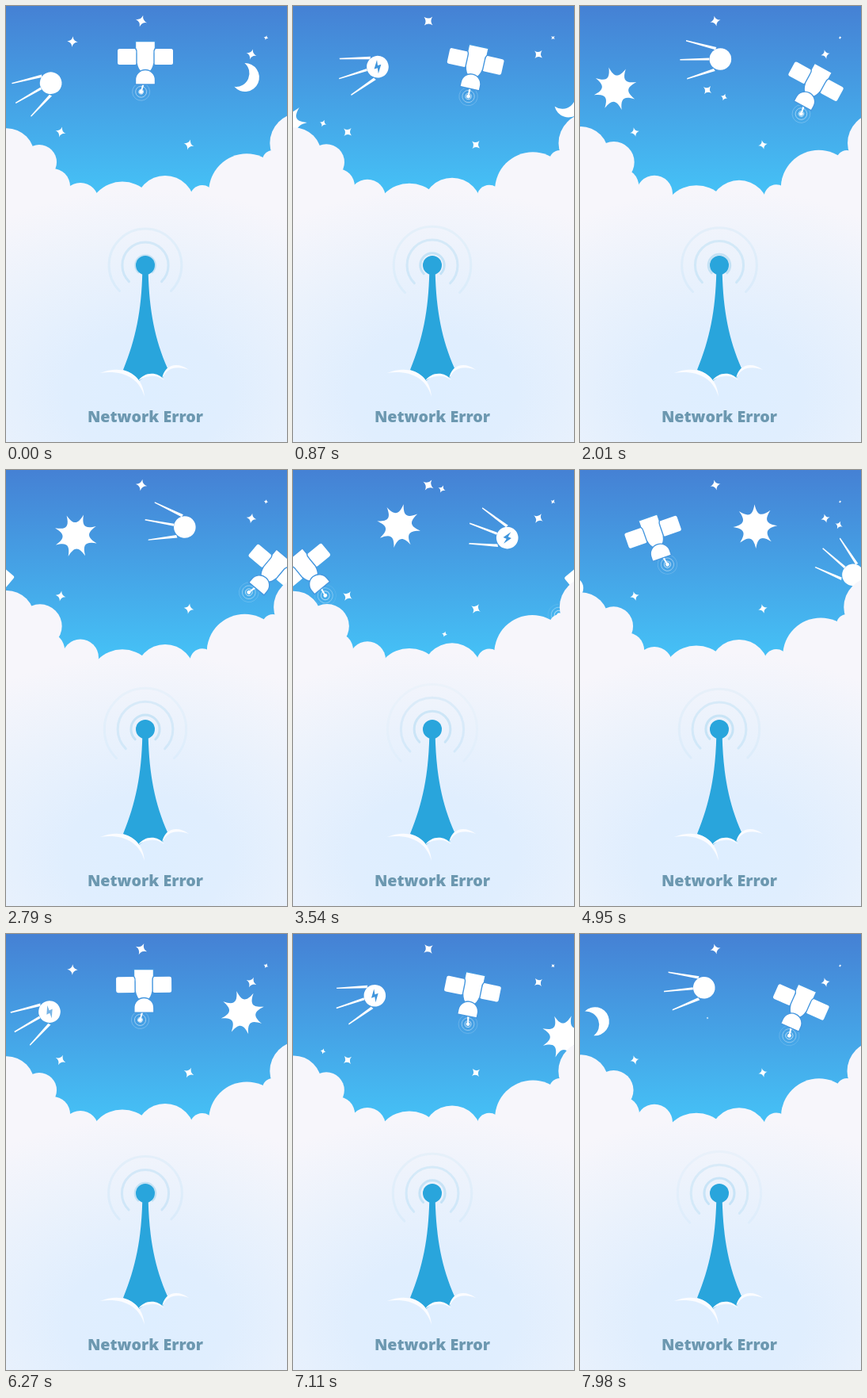
An HTML page that plays this animation: 355x550 px, repeating every 8000 ms.

```html
<!DOCTYPE html>
<html lang="en">
<head>
<meta charset="utf-8">
<title>Network Error</title>
<style>
  html, body { margin: 0; width: 100%; height: 100%; overflow: hidden; }
  svg { display: block; width: 355px; height: 550px; }
  text { font: 800 19.7px "Open Sans", "Noto Sans", sans-serif; fill: #6c98b0; }
</style>
</head>
<body>
<svg viewBox="0 0 355 550">
  <defs>
    <linearGradient id="sky" gradientUnits="userSpaceOnUse" x1="0" y1="0" x2="0" y2="228">
      <stop stop-color="#4581d4"/><stop offset="1" stop-color="#45bff5"/>
    </linearGradient>
    <radialGradient id="mist" gradientUnits="userSpaceOnUse" r="1" gradientTransform="translate(178 490) scale(350 260)" cx="0" cy="0">
      <stop stop-color="#deeeff"/><stop offset=".3" stop-color="#e0eefe"/><stop offset=".65" stop-color="#ebf2fc"/><stop offset="1" stop-color="#f7f6fb"/>
    </radialGradient>
    <path id="star" d="M0-1Q.13-.13 1 0Q.13.13 0 1Q-.13.13-1 0Q-.13-.13 0-1z" fill="#fff"/>
  </defs>
  <rect width="355" height="550" fill="url(#sky)"/>
  <g id="stars"></g>
  <g id="wheel" fill="#fff"></g>
  <g id="clouds" fill="url(#mist)"><path d="M0 190L45 195L58 226L94 240H300L330 192H342L355 180V550H0z"/></g>
  <g id="waves" fill="none" stroke="#2ba3da" stroke-width="3" stroke-linecap="round"></g>
  <g fill="#29a5dc">
    <circle cx="176" cy="327" r="12"/>
    <path d="M172.3 336C171 385 164 420 148 459Q160 462 168 473Q184 458 198 470Q199 462 204 457C188 420 181 385 179.7 336z"/>
  </g>
  <g fill="#fbfcff">
    <path d="M119 463C145 452 173 462 175 493C168 468 146 459 119 463z"/>
    <path d="M167 473C174 462 191 460 200 472C190 465 178 465 167 473z"/>
    <path d="M197 471C199 454 215 447 231 459C217 454 203 455 197 471z"/>
  </g>
  <text x="176" y="525" text-anchor="middle">Network Error</text>
</svg>
<script>
const LOOP = 8000, STEP = 30;
const TURN = 25.2, DRIFT = TURN / 4, SWING = 3, PULSE = 1.05;
const CX = 176, CY = 318, TAU = Math.PI * 2;
const $ = id => document.getElementById(id);

function add(parent, tag, attrs) {
  const el = document.createElementNS('http://www.w3.org/2000/svg', tag);
  set(el, attrs);
  return parent.appendChild(el);
}
function set(el, attrs) {
  for (const k in attrs) el.setAttribute(k, attrs[k]);
}
const mod = (a, n) => ((a % n) + n) % n;
const clamp = v => Math.max(0, Math.min(1, v));
const wave = (t, period, peak) => Math.cos(TAU * (t - peak) / period);

// Everything on the wheel is drawn at twelve o'clock, then turned into its slot.
const wheel = $('wheel');
const slot = (deg, y) => add(
  add(wheel, 'g', { transform: `rotate(${deg} ${CX} ${CY})` }),
  'g', { transform: `translate(${CX} ${y})` });

const antennas = [], bolts = [], moons = [], suns = [];
const signals = [];

function addSatellite(deg) {
  const g = slot(deg, 0);
  const edge = { stroke: '#4597df', 'stroke-width': 1.4 };
  for (const x of [-35, 11]) add(g, 'rect', { x, y: 54, width: 24, height: 20, rx: 2.5 });
  const arm = add(g, 'g', {});
  add(arm, 'path', { d: 'M-1.3 96H1.3L.8 109H-.8z' });
  add(arm, 'circle', { cy: 109, r: 2.4 });
  const rings = add(arm, 'g', { transform: 'translate(0 109)', fill: 'none', stroke: '#fff', 'stroke-width': .9 });
  signals.push({ scale: .24, strength: 3.6, rings: [0, 1, 2].map(() => add(rings, 'circle', {})) });
  antennas.push(arm);
  add(g, 'path', { d: 'M-12.5 44.5H12.5V53Q10.500 56 11 60V72Q9 82 4 84H-4Q-9 82-11 72V60Q-10.500 56-12.500 53z', ...edge });
  add(g, 'path', { d: 'M-12.500 99V93A12.500 12.500 0 0 1 12.500 93V99z', ...edge });
}

function addProbe(deg) {
  const g = slot(deg, 67);
  add(g, 'circle', { r: 13.8 });
  add(g, 'path', { d: 'M-43.500-23.700L-5-15L-6.500-11.800L-43.500-22.200zM-51 .2L-14-1.500V1.500L-51 1.700zM-42 24.200L-8.500 12L-6.500 15L-42 25.700z' });
  bolts.push(add(g, 'path', { d: 'M1.500-8.500L-5 1.500H-.5L-1.500 8.500L5-1.500H.5z', fill: '#3f95dc' }));
}

function addMoon(deg) {
  moons.push(add(slot(deg, 57.5), 'path', { d: 'M-7.600-16.300A18 18 0 1 1-7.600 16.300A17 17 0 0 0-7.600-16.300z' }));
}

function addSun(deg) {
  const at = (r, k) => `${r * Math.sin(k * TAU / 8)} ${-r * Math.cos(k * TAU / 8)}`;
  let d = 'M' + at(28, 0);
  for (let k = 0; k < 8; k++) d += `C${at(14, k + .25)} ${at(14, k + .75)} ${at(28, k + 1)}`;
  suns.push(add(slot(deg, 67), 'path', { d: d + 'z' }));
}

[0, -90].forEach(addSatellite);
[-28.4, -118.4].forEach(addProbe);
[28.9, -151.1].forEach(addMoon);
addSun(-60.3);

// x, y, size, shrink
const steady = [[171, 19, 7.8, .07], [310, 61, 6.9, .08], [69, 159, 6.9, .07], [231, 175, 6.9, .07], [328.5, 40, 3.2, .2]]
  .map(([x, y, r, shrink]) => ({ x, y, r, shrink, el: add($('stars'), 'use', { href: '#star' }) }));
// x, y, start, tilt
const flashes = [[84, 45, -.45, -40], [38, 148, .65, 0], [161, 106, 1.62, 0], [182, 115, 1.8, 0],
  [188, 24, 3.3, 0], [191.5, 207, 3.37, 0], [327, 69.5, 4.7, 0]]
  .map(([x, y, start, tilt]) => ({ x, y, start, tilt, el: add($('stars'), 'use', { href: '#star' }) }));

// x, top, radius, then how far x and the top move with the drift
const puffs = [[1, 153.3, 35, 0, -1.3], [55.5, 205, 22.5, -4, 0], [94, 218.7, 23, 0, -5.5],
  [147, 223.7, 44, 0, 2.8], [201, 216.7, 37.5, 0, 3.5], [248, 225.7, 15.5, 0, -.4],
  [303, 184.3, 48, -1.5, -2.7], [337, 182, 13, 0, 0], [373.5, 135, 38, 2.8, 0]]
  .map(([x, top, r, dx, dy]) => ({ x, top, r, dx, dy, el: add($('clouds'), 'circle', { r }) }));
const swell = add($('clouds'), 'circle', {});

signals.push({ scale: 1, strength: 1, rings: [0, 1, 2].map(() => add($('waves'), 'path', {})) });

function drawSignals(t) {
  for (const { scale, strength, rings } of signals) {
    rings.forEach((el, k) => {
      const r = 12.3 + 16.8 * (k + mod(-t / PULSE, 1));
      const a = r * Math.SQRT1_2;
      set(el, {
        r: r * scale,
        d: `M${176 - a} ${327 + a}A${r} ${r} 0 1 1 ${176 + a} ${327 + a}`,
        opacity: clamp(.26 * (1 - r / 63) * strength)
      });
    });
  }
}

function drawStars(t) {
  const size = wave(t, SWING, .45);
  for (const { x, y, r, shrink, el } of steady) {
    const s = r * (1 - shrink * (1 - size));
    set(el, { transform: `translate(${x} ${y}) rotate(${17 + 30 * t}) scale(${s})` });
  }
  for (const { x, y, start, tilt, el } of flashes) {
    const u = mod(t - start, DRIFT) / .9;
    const s = u < 1 ? 6.7 * Math.sin(Math.PI * u) : 0;
    set(el, { transform: `translate(${x} ${y}) rotate(${tilt + 90 * u}) scale(${s})` });
  }
}

function drawClouds(t) {
  const w = wave(t, DRIFT, 2.45);
  for (const { x, top, r, dx, dy, el } of puffs) {
    set(el, { cx: x + dx * w, cy: top + r + dy * w });
  }
  const grow = (1 - wave(t, DRIFT, .1)) / 2;
  set(swell, { cx: 42 + grow, cy: 197, r: 22 + 6 * grow });
}

function draw(t) {
  set(wheel, { transform: `rotate(${360 * t / TURN} ${CX} ${CY})` });
  const swing = -wave(t, SWING, .07);
  for (const el of antennas) set(el, { transform: `rotate(${-16.5 * swing} 0 90)` });
  for (const el of moons) set(el, { transform: `rotate(${8 + 13.5 * swing})` });
  for (const el of suns) set(el, { transform: `rotate(${19 - 24.5 * t})` });
  const beat = mod(t, SWING);
  const glow = clamp((beat - .13) / .2) * clamp((1.37 - beat) / .2);
  for (const el of bolts) set(el, { opacity: glow });
  drawSignals(t);
  drawStars(t);
  drawClouds(t);
}

const start = performance.now();
function tick() {
  const ms = (performance.now() - start) % LOOP;
  draw(Math.floor(ms / STEP) * STEP / 1000);
  requestAnimationFrame(tick);
}
tick();
</script>
</body>
</html>
```
